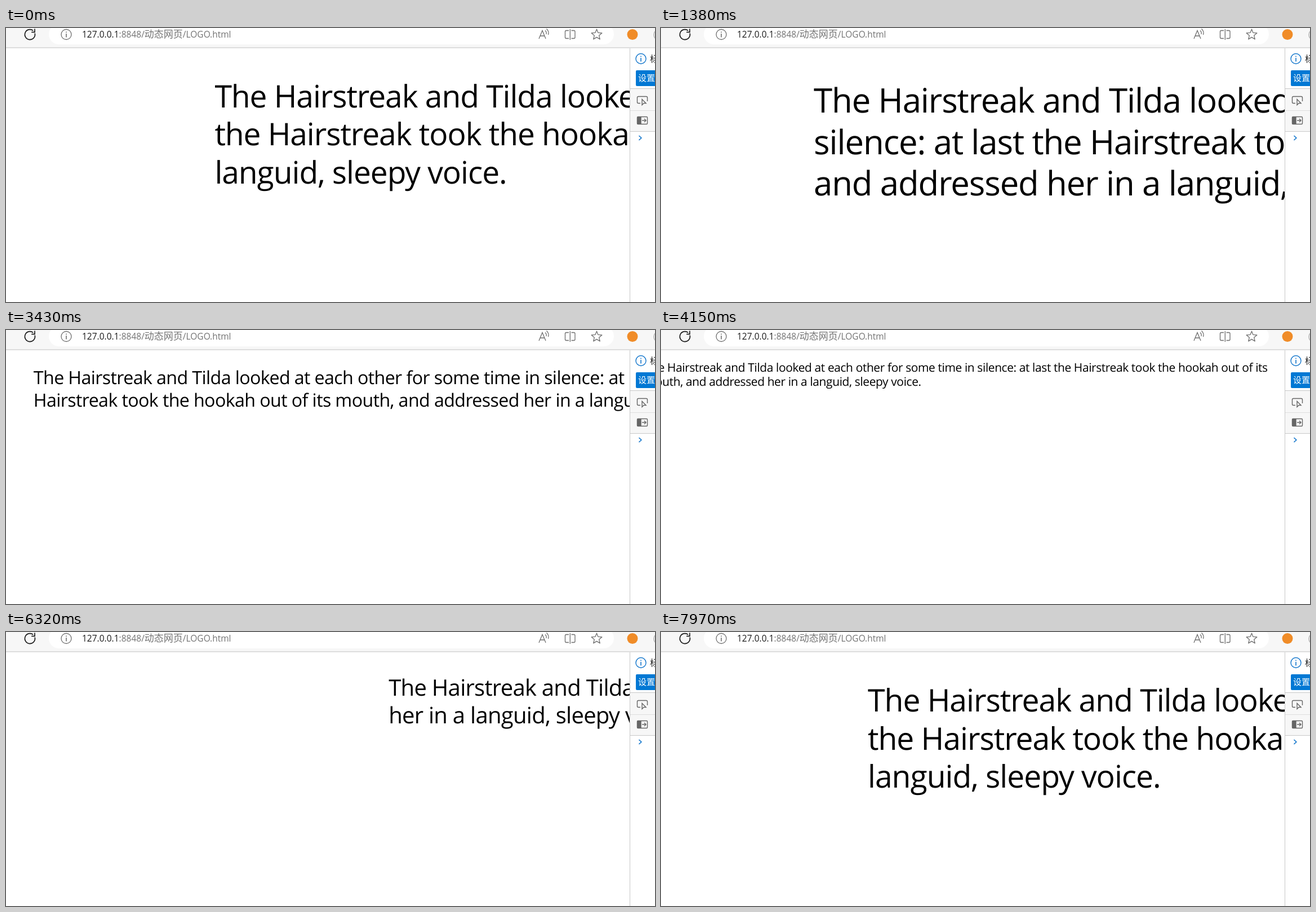
Recreate the animation shown at these times as an HTML page. Size 1152 by 486 pixels, loop 8000 ms.

```html
<!DOCTYPE html>
<html lang="zh">
<meta charset="utf-8">
<title>Sliding paragraph</title>
<style>
html, body { margin: 0; width: 100%; height: 100%; overflow: hidden; background: #fff; }
svg { position: absolute; left: 0; top: 0; font-family: "Open Sans", "Noto Sans CJK SC", "Noto Sans CJK", sans-serif; }
.page { position: absolute; left: 0; top: 35px; width: 1107px; height: 451px; overflow: hidden; }
p {
  position: absolute; top: 0; margin: .937em 0 0;
  font-family: "Open Sans", "Noto Sans", sans-serif;
  line-height: 1.2276; letter-spacing: -.019em; color: #000;
  text-rendering: geometricPrecision;
  animation: slide 7940ms ease infinite paused;
}
@keyframes slide {
  from { left: 1099px; width: 3360px; font-size: 19.7px; }
  75% { left: 249px; width: 1680px; font-size: 61px; }
  to { left: -38px; width: 1120px; font-size: 19.7px; }
}
</style>
<body>
<div class="page"><p>The Hairstreak and Tilda looked at each other for some time in silence: at last the Hairstreak took the hookah out of its mouth, and addressed her in a languid, sleepy voice.</p></div>
<svg width="1152" height="486" fill="none">
  <!-- address bar -->
  <rect width="1152" height="35" fill="#f7f7f7"/>
  <rect y="34.5" width="1152" height="1" fill="#bfbfbf"/>
  <rect x="76" y="-7" width="1003" height="36" rx="18" fill="#fff"/>
  <g stroke="#1a1a1a" stroke-width="1.7">
    <path d="M51.2 9.5A9 9 0 1 1 48.2 4.7"/>
    <path d="M51 1.5V7.3H45.2"/>
  </g>
  <g stroke="#6e6e6e" stroke-width="1.3">
    <circle cx="107" cy="11.5" r="9"/>
    <path d="M107 10V16.5M107 6.5V8.2" stroke-width="1.6"/>
    <path d="M946 19L952 4.5L958 19M948.2 14H955.8M957 4.5Q960 7 959 11M959.5 1.5Q964.5 6 962.5 12"/>
    <path d="M999 4.5H994.5Q992.5 4.5 992.5 6.5V16.5Q992.5 18.5 994.5 18.5H999M1003.5 4.5H1008Q1010 4.5 1010 6.5V16.5Q1010 18.5 1008 18.5H1003.5M1001.3 2V21"/>
    <path id="star" stroke-linejoin="round"/>
    <circle cx="1160" cy="12" r="10" stroke="#aaa"/>
  </g>
  <circle cx="1112" cy="11.5" r="9.5" fill="#f08c28"/>
  <text x="135" y="17" font-size="15.5" fill="#1a1a1a">127.0.0.1<tspan fill="#737373">:8848/<tspan font-size="17">动态网页</tspan>/LOGO.html</tspan></text>
  <!-- developer panel -->
  <rect x="1107" y="36" width="45" height="450" fill="#fff"/>
  <rect x="1108" y="107" width="44" height="76" fill="#f7f7f7"/>
  <path d="M1107.5 36V486M1108 107.5H1152M1108 183.5H1152" stroke="#c8c8c8"/>
  <path d="M1108 146.5H1152" stroke="#dedede"/>
  <g stroke="#0f74cb" stroke-width="1.4">
    <circle cx="1127" cy="54.5" r="9"/>
    <path d="M1127 53V59.5M1127 49.5V51.2M1123.5 191L1127.8 195L1123.5 199" stroke-width="1.6"/>
  </g>
  <text x="1143" y="60" font-size="15" fill="#222">标</text>
  <rect x="1118" y="75" width="40" height="28" rx="2" fill="#0078d4"/>
  <text x="1122" y="94" font-size="15" fill="#fff">设置你</text>
  <g stroke="#666" stroke-width="1.4">
    <path d="M1126 133.5H1122.5Q1120.5 133.5 1120.5 131.5V123.5Q1120.5 121.5 1122.5 121.5H1136.5Q1138.5 121.5 1138.5 123.5V130"/>
    <path d="M1129 126.5V136.5L1132 133.5H1136Z" fill="#f7f7f7"/>
    <rect x="1120.5" y="157.5" width="18" height="13" rx="1.5"/>
    <rect x="1121" y="158" width="6" height="12" fill="#666"/>
    <path d="M1129 164H1136M1133 161L1136 164L1133 167"/>
  </g>
</svg>
<script>
const LOOP = 8000, STEP = 65.87, OFFSET = 3345;

const points = Array.from({ length: 10 }, (_, i) => {
  const r = i % 2 ? 4.4 : 9.8, a = Math.PI * (i / 5 - .5);
  return [1048.5 + r * Math.cos(a), 12 + r * Math.sin(a)].join(" ");
});
document.getElementById("star").setAttribute("d", "M" + points.join("L") + "Z");

const slide = document.querySelector("p").getAnimations()[0];

function draw() {
  const step = Math.floor((performance.now() % LOOP + 4) / STEP);
  slide.currentTime = OFFSET + step * STEP;
  requestAnimationFrame(draw);
}
draw();
</script>
</body>
</html>
```
